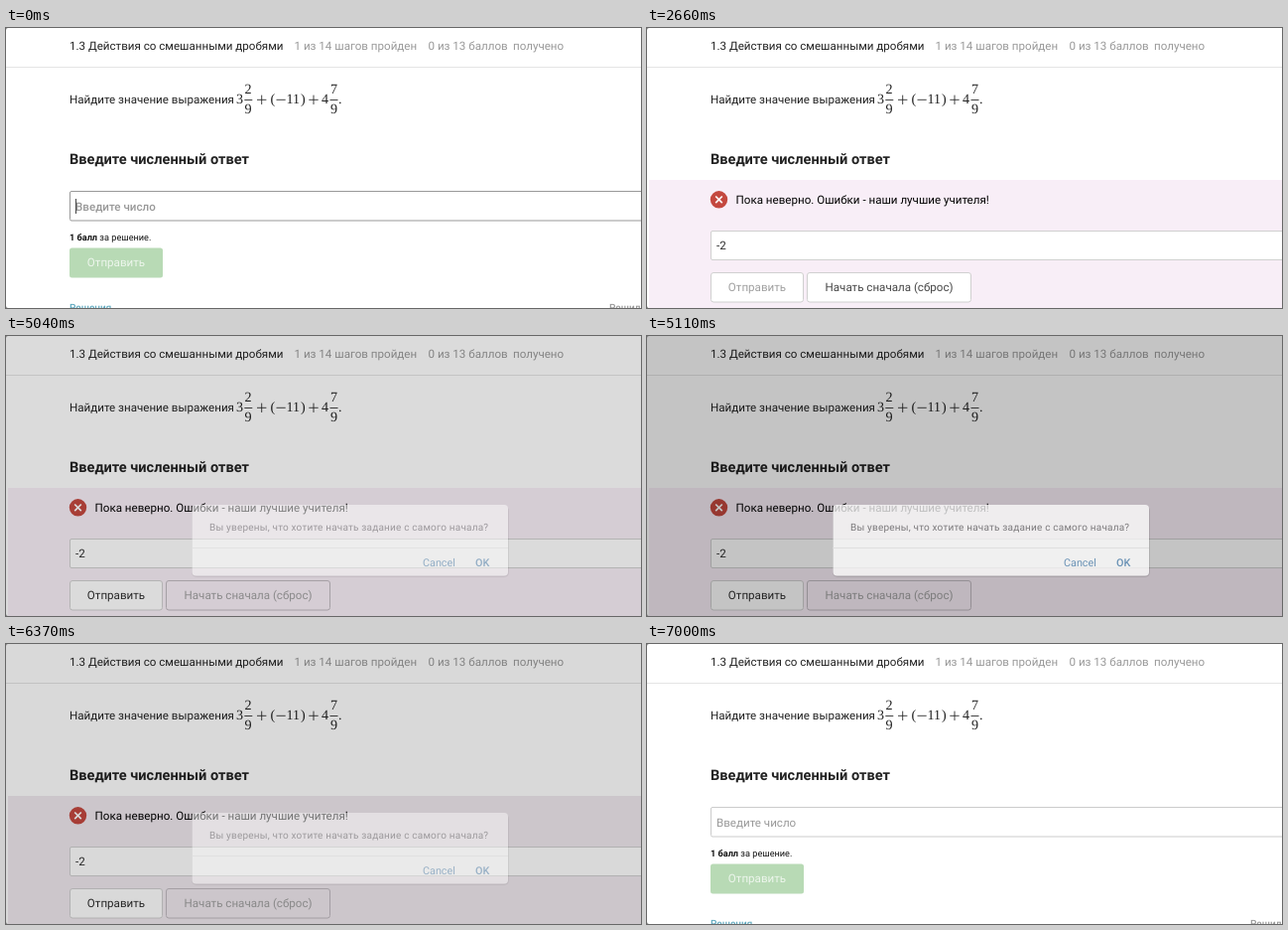
These frames come from a looping animation (640 px wide and 282 px high, 7210 ms). An HTML page:

```html
<!DOCTYPE html>
<html lang="ru">
<head>
<meta charset="utf-8">
<title>Действия со смешанными дробями</title>
<style>
  html, body { margin: 0; width: 100%; height: 100%; overflow: hidden; background: #fff; }
  svg { display: block; font: 11.6px Roboto, sans-serif; fill: #222; text-rendering: geometricPrecision; }
  text { white-space: pre; }
  .muted { fill: #999; }
  .head { font-size: 14.58px; font-weight: 700; }
  .math { font: 14.1px "Liberation Serif", serif; }
  .line { stroke: #222; stroke-width: .85; fill: none; }
  .small { font-size: 9.17px; fill: #111; }
  .link { font-size: 10px; font-weight: 500; }
  .msg { fill: #000; }
  .mid { text-anchor: middle; }
  .box { fill: #fff; stroke: #d0d0d0; }
  .ask { font-size: 10px; letter-spacing: .2px; fill: #666; }
  .act { font-size: 10.8px; fill: #4a80b0; }
</style>
</head>
<body>
<svg width="640" height="282" viewBox="0 0 640 282">
  <rect width="640" height="282" fill="#fff"/>
  <text x="64" y="22">1.3 Действия со смешанными дробями</text>
  <g class="muted">
    <text x="290.5" y="22">1 из 14 шагов пройден</text>
    <text x="425.5" y="22">0 из 13 баллов</text>
    <text x="511" y="22">получено</text>
  </g>
  <path d="M0 39.5H640" stroke="#e4e4e4"/>

  <text x="64" y="76">Найдите значение выражения</text>
  <g class="math">
    <text x="232" y="76">3</text>
    <text x="240.6" y="66.3">2</text>
    <text x="240.6" y="85.7">9</text>
    <text x="266.4" y="76">(</text>
    <text x="282.6" y="76">11</text>
    <text x="297" y="76">)</text>
    <text x="318" y="76">4</text>
    <text x="327" y="66.3">7</text>
    <text x="327" y="85.7">9</text>
    <text x="335" y="76">.</text>
  </g>
  <path class="line" d="M240.3 72.5h8M326.5 72.5h8M253 72.3h9.4M257.7 67.6v9.4M272.5 72.3h9.2M305.3 72.3h9.4M310 67.6v9.4"/>
  <text class="head" x="64" y="137">Введите численный ответ</text>

  <g id="form">
    <rect class="box" id="field" x="64.5" y="164.5" width="600" height="29.5" rx="1.5"/>
    <text class="muted" id="hint" x="70" y="184">Введите число</text>
    <text id="typed" x="70" y="184"></text>
    <path id="caret" d="M0 172v15" stroke="#444"/>
    <text class="small" x="64" y="214"><tspan font-weight="700">1 балл</tspan> за решение.</text>
    <rect id="send" x="64" y="221.5" width="94" height="30" rx="2.5"/>
    <text class="mid" id="sendText" x="111" y="240.3" fill="#fff">Отправить</text>
  </g>

  <g id="panel">
    <rect id="tint" x="2" y="153" width="638" height="129"/>
    <g id="sending">
      <path id="spinner" d="M66.3 173a6.2 6.2 0 0 1 12.4 0" fill="none" stroke="#777" stroke-width="1.5"/>
      <text class="msg" x="89.5" y="177">Отправка решения... подождите, не покидайте страницу.</text>
    </g>
    <rect class="box" id="answerBox" x="64.5" y="204.5" width="600" height="29" rx="1.5"/>
    <text id="answer" x="70" y="223.3">-2</text>
    <g id="result">
      <circle cx="72.5" cy="172.8" r="8.7" fill="#c4483f"/>
      <path d="M69.2 169.5l6.6 6.6m0-6.6l-6.6 6.6" stroke="#fff" stroke-width="1.7"/>
      <text class="msg" x="89.5" y="177">Пока неверно. Ошибки - наши лучшие учителя!</text>
      <rect class="box" x="64.5" y="246.5" width="93" height="29.5" rx="2.5"/>
      <text class="mid" id="again" x="111" y="264.8">Отправить</text>
      <rect class="box" id="resetBox" x="161.5" y="246.5" width="165" height="29.5" rx="2.5"/>
      <text class="mid" id="reset" x="244" y="264.8">Начать сначала (сброс)</text>
    </g>
  </g>

  <g id="footer">
    <text class="link" id="link" x="64" y="285">Решения</text>
    <text class="link muted" x="608" y="285">Решили</text>
  </g>

  <rect id="dim" width="640" height="282" fill="#000"/>
  <g id="dialog">
    <rect x="187" y="171" width="320" height="72" rx="5" fill="#000" opacity=".14"/>
    <rect x="187.5" y="170" width="318.5" height="71.5" rx="4" fill="#fff"/>
    <path d="M187.5 213.5h318.5" stroke="#e9e9e9"/>
    <text class="ask" x="205" y="196">Вы уверены, что хотите начать задание с самого начала?</text>
    <text class="act" x="420" y="231.5">Cancel</text>
    <text class="act" x="473" y="231.5" font-weight="500">OK</text>
  </g>
  <path d="M0 0h2Q0 0 0 2zM0 282v-2Q0 282 2 282z" fill="#777"/>
</svg>
<script>
const LOOP = 7210, TICK = 70;
const el = {};
document.querySelectorAll('[id]').forEach(n => el[n.id] = n);

// [time, value] stops, linear in between
const tracks = {
  send: [[0, .5], [490, .5], [560, .78], [630, 1], [6790, 1], [6860, .5]],
  hover: [[910, 0], [980, .6], [1050, 1], [6790, 1], [6860, 0]],
  pink: [[2030, 0], [2100, .55], [2310, 1]],
  swap: [[4270, 0], [4340, .06], [4410, .06], [4480, .6], [4550, 1]],
  dim: [[4970, 0], [5040, .14], [5110, .23], [5180, .3], [5320, .36], [6230, .36],
        [6300, .35], [6370, .15], [6440, 0]],
  dialog: [[4970, 0], [5040, .5], [5110, .75], [5180, .9], [5320, 1], [6300, 1],
           [6370, .45], [6440, .05], [6720, 0]]
};

function value(name, t) {
  const stops = tracks[name];
  const i = stops.findIndex(s => s[0] > t);
  if (i === 0) return stops[0][1];
  if (i < 0) return stops[stops.length - 1][1];
  const [t0, a] = stops[i - 1], [t1, b] = stops[i];
  return a + (b - a) * (t - t0) / (t1 - t0);
}

const mix = (a, b, k) => `rgb(${a.map((v, i) => Math.round(v + (b[i] - v) * k))})`;
const show = (node, on) => node.style.display = on ? '' : 'none';
const paint = (node, color) => node.style.fill = color;
const DARK = [45, 45, 45], GREY = [160, 160, 160];

function render(t) {
  const sending = t >= 1330 && t < 2100;
  const result = t >= 2100 && t < 6860;
  const fresh = t >= 6860;
  show(el.form, !sending && !result);
  show(el.panel, sending || result);
  show(el.sending, sending);
  show(el.result, result);
  show(el.footer, !result);

  const typed = fresh || t < 560 ? '' : t < 980 ? '-' : '-2';
  el.typed.textContent = typed;
  show(el.hint, !typed);
  el.hint.style.fontWeight = t < 70 ? 500 : 400;
  show(el.caret, !fresh && (t < 420 || t >= 560));
  el.caret.setAttribute('transform', `translate(${70.5 + [0, 3.5, 10][typed.length]})`);
  el.field.style.stroke = fresh ? '#ccc' : '#999';
  paint(el.send, mix([114, 182, 108], [98, 168, 94], value('hover', t)));
  el.send.style.opacity = value('send', t);
  el.sendText.style.opacity = .5 + value('send', t) / 2;
  paint(el.link, sending ? '#8aa5b5' : '#5fa9bf');

  const pink = value('pink', t);
  paint(el.tint, t >= 6370 ? '#efe8ee' : mix([243, 243, 243], [248, 238, 247], pink));
  el.spinner.setAttribute('transform', `rotate(${(t - 1330) * .36} 72.5 173)`);
  paint(el.answerBox, mix([243, 243, 243], [255, 255, 255], pink));
  el.answerBox.style.stroke = mix([170, 170, 170], [208, 208, 208], pink);
  paint(el.answer, mix(GREY, DARK, pink));

  const swap = value('swap', t);
  const pressed = t >= 5040;
  paint(el.again, mix(GREY, DARK, swap));
  paint(el.reset, mix([70, 70, 70], GREY, swap));
  paint(el.resetBox, pressed ? 'none' : '#fff');
  el.resetBox.style.stroke = pressed ? '#c0bac0' : '';

  el.dim.style.opacity = value('dim', t);
  el.dialog.style.opacity = value('dialog', t);
}

const start = performance.now();
function frame() {
  const t = (performance.now() - start) % LOOP;
  render(Math.floor(t / TICK) * TICK);
  requestAnimationFrame(frame);
}
frame();
</script>
</body>
</html>
```
